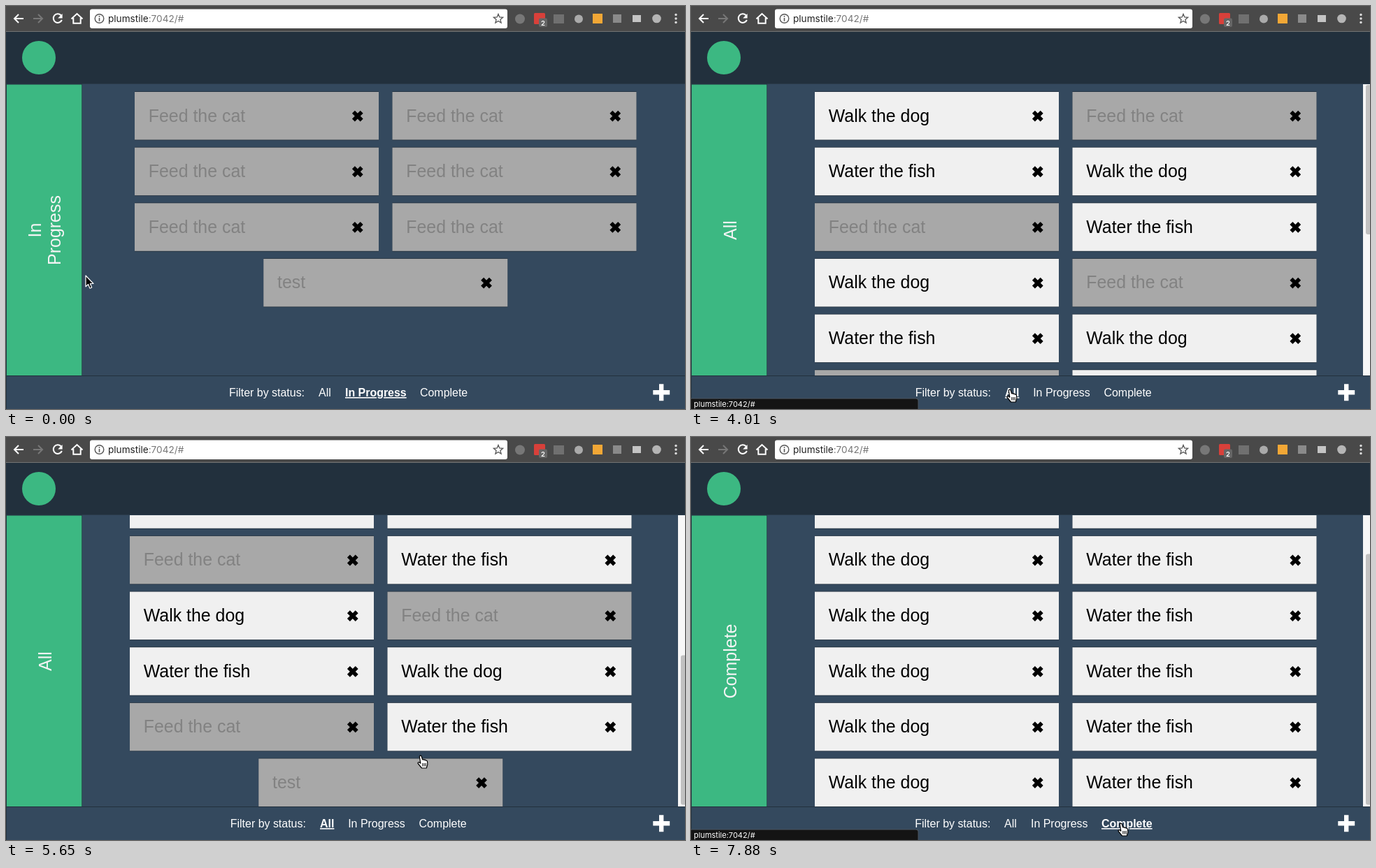
Animation of 971x577 px, one loop 8000 ms. Source, as an HTML page:

```html
<!DOCTYPE html>
<html lang="en">
<head>
<meta charset="utf-8">
<title>Task list</title>
<style>
html, body { margin: 0; width: 100%; height: 100%; overflow: hidden; background: #34495e; }
svg { display: block; width: 971px; height: 577px; font-family: "Liberation Sans", Arial, sans-serif; }
text { white-space: pre; }
.bar { font-family: Inter, Roboto, sans-serif; }
.card text { font-size: 24.9px; }
.todo { fill: #f0f0f0; }
.busy { fill: #a8a8a8; }
.busy + text { fill: #828282; }
.hover .face { fill: #3cb882; }
.links { font-size: 15.95px; fill: #fff; }
.on { font-weight: bold; text-decoration: underline; }
.label { font-size: 25px; fill: #f4f4f4; text-anchor: middle; }
.line { fill: none; stroke: #fff; stroke-width: 2; }
</style>
</head>
<body>
<svg viewBox="0 0 971 577">
  <defs>
    <clipPath id="view"><rect y="112" width="971" height="417.5"/></clipPath>
    <path id="cross" d="M-5.9-5.9 5.9 5.9M5.9-5.9-5.9 5.9" stroke="#000" stroke-width="5.6"/>
  </defs>
  <rect width="971" height="577" fill="#34495e"/>

  <g id="lists" clip-path="url(#view)"></g>
  <g id="scrollbar">
    <rect x="961" y="112" width="10" height="417" fill="#f7f7f7"/>
    <rect id="thumb" x="965" width="8" rx="3" fill="#c1c1c1"/>
  </g>

  <rect y="37" width="971" height="74.5" fill="#22303d"/>
  <circle cx="47" cy="74" r="24" fill="#3cb882"/>

  <rect y="111.5" width="109" height="418" fill="#22303d"/>
  <rect x="1" y="112.5" width="107.3" height="416.5" fill="#3cb882"/>
  <g id="labels"></g>

  <rect y="529" width="971" height="48" fill="#22303d"/>
  <rect x="1" y="530" width="970" height="47" fill="#34495e"/>
  <g id="filters"></g>
  <path d="M928.5 553.3H946M937.2 544.5V562" fill="none" stroke="#fff" stroke-width="6.4" stroke-linecap="square" stroke-linejoin="round"/>

  <g id="toolbar" class="bar">
    <rect width="971" height="36" fill="#494949"/>
    <rect y="36" width="971" height="1" fill="#737373"/>
    <path class="line" d="M25 18H12.5M18 12 12 18 18 24"/>
    <path class="line" d="M39 18H51.5M46 12 52 18 46 24" style="stroke:#777"/>
    <path class="line" d="M78.6 13.2A6.3 6.3 0 1 0 79.9 20"/>
    <path d="M80.6 11V17.4H74.2Z" fill="#fff"/>
    <path class="line" d="M93.5 18.5 101.5 11 109.500 18.500M96.300 17V24.800H106.700V17"/>
    <rect x="120" y="4.500" width="597" height="27.500" rx="3" fill="#fff"/>
    <circle cx="133.500" cy="18" r="6.300" fill="none" stroke="#555" stroke-width="1.400"/>
    <path d="M133.500 14V15.700M133.500 17V21.800" stroke="#555" stroke-width="1.600"/>
    <text x="146" y="23" font-size="13.600" fill="#222">plumstile<tspan fill="#777">:7042/#</tspan></text>
    <path d="M704 11.500 705.800 16 710.600 16.300 706.900 19.400 708.100 24.100 704 21.500 699.900 24.100 701.100 19.400 697.400 16.300 702.200 16Z" fill="none" stroke="#555" stroke-width="1.300"/>
    <circle cx="735" cy="18.500" r="7" fill="#777"/>
    <rect x="755" y="10" width="16" height="16" rx="1.500" fill="#d8403a"/>
    <rect x="762" y="17.500" width="12" height="12.500" rx="2" fill="#666"/>
    <text x="768" y="27.500" font-size="9.500" font-weight="600" text-anchor="middle" fill="#fff">2</text>
    <rect x="783" y="12" width="15" height="13" fill="#707070"/>
    <circle cx="819" cy="18.500" r="6" fill="#aaa"/>
    <rect x="839" y="11" width="14" height="14" fill="#f2a736"/>
    <rect x="868" y="12" width="12" height="12" fill="#8a8a8a"/>
    <rect x="896" y="13" width="12" height="10" fill="#c4c4c4"/>
    <circle cx="930.500" cy="18" r="6.300" fill="#b5b5b5"/>
    <g fill="#ddd"><circle cx="958" cy="12.500" r="1.700"/><circle cx="958" cy="18" r="1.700"/><circle cx="958" cy="23.500" r="1.700"/></g>
  </g>

  <g id="status" class="bar">
    <path d="M0 561.500H322Q325.500 561.500 325.500 565V577H0Z" fill="#4a545e"/>
    <path d="M0 562.500H321.500Q324.500 562.500 324.500 565.500V577H0Z" fill="#141414"/>
    <text x="4" y="574" font-size="11" fill="#fff">plumstile:7042/#</text>
  </g>

  <g id="pointer" stroke-linejoin="round">
    <path id="arrow" d="M0 0V15.800L3.600 12.500 6 18.200 8.700 17 6.300 11.500H11Z" fill="#000" stroke="#fff" stroke-width="1.200"/>
    <g id="beam" fill="none">
      <path d="M-3.500-8Q0-8 0-5.500Q0-8 3.500-8M0-6V6M-3.500 8Q0 8 0 5.500Q0 8 3.500 8M-2 3H2" stroke="#fff" stroke-opacity=".6" stroke-width="2.600"/>
      <path d="M-3.500-8Q0-8 0-5.500Q0-8 3.500-8M0-6V6M-3.500 8Q0 8 0 5.500Q0 8 3.500 8M-2 3H2" stroke="#000" stroke-width="1.200"/>
    </g>
    <g id="hand">
      <path d="M-1.700 1.500Q-.8-.8 1 .8L2.700 6Q4.200 5 5 6.500Q6.500 5.700 7.300 7.200Q9.300 6.600 9.600 9L9.800 13 8.300 18H1.500L-3.800 11.500Q-4.300 9.300-2 9.800L-.2 11.200Z" fill="#fff" stroke="#000" stroke-width="1.200"/>
      <path d="M2.800 11V15.500M5 11V15.500M7.200 11V15.500" stroke="#000"/>
    </g>
  </g>
</svg>

<script>
const LOOP = 8000, TICK = 148.68;
const TOP = 123, PITCH = 79.65, GAP = 368.5, W = 349, H = 68.500;
const BUSY = "Feed the cat";
const $ = id => document.getElementById(id);
const show = (el, on) => el.style.display = on ? "" : "none";

function make(parent, tag, attrs, text) {
  const el = document.createElementNS("http://www.w3.org/2000/svg", tag);
  for (const k in attrs) el.setAttribute(k, attrs[k]);
  if (text) el.textContent = text;
  return parent.appendChild(el);
}

const repeat = (names, n) => Array.from({ length: n }, (_, i) => names[i % names.length]);
const modes = [
  { name: "In Progress", left: 184, links: [319, 447, 485, 592], items: [...repeat([BUSY], 6), "test"] },
  { name: "All", left: 177, links: [320.8, 449, 489.2, 590.5], thumb: 214,
    items: [...repeat(["Walk the dog", BUSY, "Water the fish"], 18), "test"] },
  { name: "Complete", left: 177, links: [320.3, 448, 486, 587], thumb: 359,
    items: repeat(["Walk the dog", "Water the fish"], 12) }
];

function addCard(list, left, items, i) {
  const alone = i === items.length - 1 && i % 2 === 0;
  const x = left + (alone ? GAP / 2 : i % 2 * GAP);
  const y = TOP + Math.floor(i / 2) * PITCH;
  const state = items[i] === BUSY || items[i] === "test" ? "busy" : "todo";
  const el = make(list, "g", { class: "card", transform: `translate(${x} ${y})` });
  make(el, "rect", { y: -.8, width: W, height: H + 1.6, fill: "#22303d" });
  make(el, "rect", { class: "face " + state, width: W, height: H });
  make(el, "text", { x: 19.8, y: 42.500 }, items[i]);
  make(el, "use", { href: "#cross", x: 318.800, y: 34.600 });
  return { el, x, y };
}

for (const m of modes) {
  m.list = make($("lists"), "g", {});
  m.cards = m.items.map((_, i) => addCard(m.list, m.left, m.items, i));
  m.max = m.thumb ? m.cards.at(-1).y + H - 529 : 0;

  m.label = make($("labels"), "g", { class: "label" });
  const lines = m.name.split(" ");
  lines.forEach((word, i) => {
    const x = lines.length > 1 ? 49.5 + i * 28.700 : 64.500;
    make(m.label, "text", { transform: `translate(${x} 321) rotate(-90)` }, word);
  });

  m.footer = make($("filters"), "g", { class: "links" });
  ["Filter by status:", "All", "In Progress", "Complete"].forEach((word, i) =>
    make(m.footer, "text", { x: m.links[i], y: 559, class: word === m.name ? "on" : "" }, word));
}

// Tracks: tick, then values
const path = [
  [0, 114, 386], [1, 131, 387], [2, 131, 387], [4, 83, 374], [8, 83, 374],
  [10, 53.5, 333.5], [11, 53.5, 333.5], [17, 214.5, 549.5], [20, 214.5, 549.5],
  [22, 393, 558], [24, 456, 549], [31, 456, 549], [32, 536, 498], [33, 590, 463],
  [35, 591, 461], [38, 593, 456], [46, 593, 456], [47, 596, 476], [48, 598, 494],
  [49, 598, 494], [50, 610, 541], [51, 615, 553]
];
const scrolling = [
  [0, 0], [33, 0], [34, 70], [35, 174.5], [36, 280], [37, 350], [38, 379.4],
  [41, 379.4], [42, 330], [43, 260]
];

function sample(track, n) {
  const i = track.findIndex(k => k[0] > n);
  if (i < 0) return track.at(-1).slice(1);
  const a = track[i - 1], b = track[i], f = (n - a[0]) / (b[0] - a[0]);
  return a.map((v, j) => v + (b[j] - v) * f).slice(1);
}

function draw(n) {
  const mode = modes[n < 25 ? 0 : n < 52 ? 1 : 2];
  const [px, py] = sample(path, n);
  const scroll = Math.min(sample(scrolling, n)[0], mode.max);
  const settled = n !== 42 && n !== 43;

  for (const m of modes)
    for (const part of [m.list, m.label, m.footer]) show(part, m === mode);
  mode.list.setAttribute("transform", `translate(0 ${-scroll})`);
  for (const { el, x, y } of mode.cards) {
    const dx = px - x, dy = py - y + scroll;
    el.classList.toggle("hover", settled && py < 529 && dx > 0 && dx < W && dy > 0 && dy < H);
  }

  show($("scrollbar"), mode.thumb);
  if (mode.thumb) {
    $("thumb").setAttribute("height", mode.thumb);
    $("thumb").setAttribute("y", 113 + scroll / mode.max * (413.5 - mode.thumb));
  }

  show($("status"), n >= 24 && n <= 33 || n >= 51);
  $("pointer").setAttribute("transform", `translate(${px} ${py})`);
  const shape = n < 22 ? "arrow" : n < 24 ? "beam" : "hand";
  for (const id of ["arrow", "beam", "hand"]) show($(id), id === shape);
}

let start, last = -1;
function frame(now) {
  start ??= now;
  const n = Math.floor(((now - start) % LOOP + 6.2) / TICK);
  if (n !== last) draw(last = n);
  requestAnimationFrame(frame);
}
draw(0);
requestAnimationFrame(frame);
</script>
</body>
</html>
```
